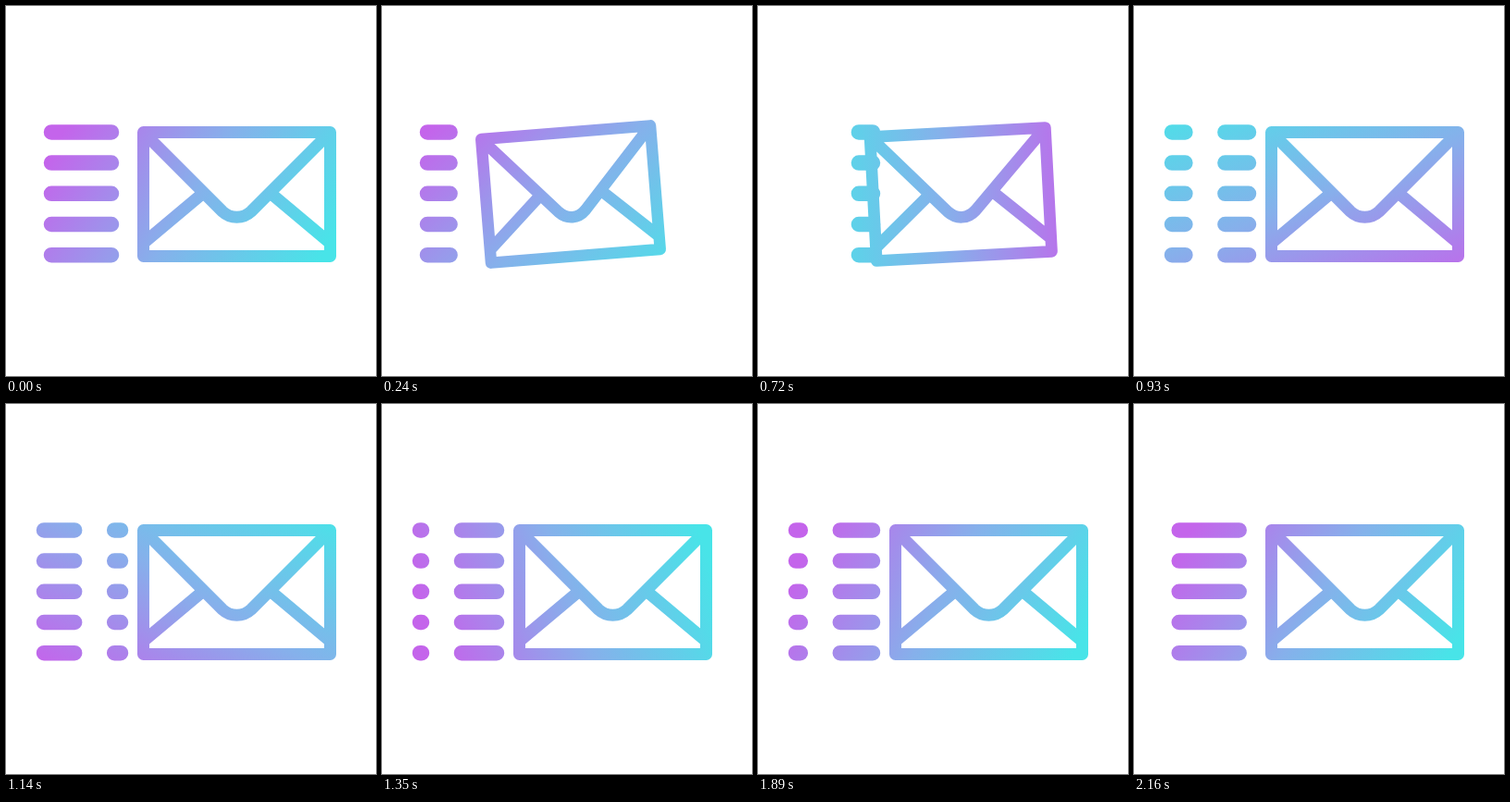
Animation, 400 px wide and 400 px high, one loop 2.22 s. Source, as an HTML page with a canvas:

```html
<!DOCTYPE html>
<html lang="en">
<head>
<meta charset="utf-8">
<title>Sending mail</title>
<style>
  html, body { margin: 0; width: 100%; height: 100%; overflow: hidden; background: #fff; }
  canvas { display: block; width: 400px; height: 400px; }
</style>
</head>
<body>
<canvas id="stage" width="400" height="400"></canvas>
<script>
const ctx = document.getElementById('stage').getContext('2d');
const LOOP = 2220, STEP = 30, LAST = 2160;
const CENTER = { x: 249.5, y: 203.5 };
const TRACK = { x: 41, length: 83, top: 136.4, gap: 33.2, rows: 5 };

const clamp = v => Math.min(1, Math.max(0, v));
const progress = (t, from, to) => clamp((t - from) / (to - from));

// Cubic Bezier easing with flat ends: control points (a, 0) and (b, 1).
function ease(a, b) {
  return p => {
    let lo = 0, hi = 1;
    for (let i = 0; i < 24; i++) {
      const s = (lo + hi) / 2, r = 1 - s;
      const x = 3 * r * r * s * a + 3 * r * s * s * b + s * s * s;
      if (x < p) lo = s; else hi = s;
    }
    return lo * lo * (3 - 2 * lo);
  };
}
const spin = ease(0.34, 0.33);
const inOut = ease(0.42, 0.58);

const envelope = new Path2D(
  'M148.5 136.5H350.5V270.5H148.5Z' +
  'M150 138L233.5 221.7C243 230.5 256 230.5 265.5 221.7L349 138' +
  'M149 256L211 204M350 256L288 204'
);

function paint(t) {
  const angle = (31 + 360 * spin(t / LAST)) * Math.PI / 180;
  const dx = 155 * Math.cos(angle), dy = 155 * Math.sin(angle);
  const g = ctx.createLinearGradient(202 - dx, 203 - dy, 202 + dx, 203 + dy);
  g.addColorStop(0, 'rgb(196,100,235)');
  g.addColorStop(0.5, 'rgb(134,176,235)');
  g.addColorStop(1, 'rgb(72,228,232)');
  return g;
}

function drawLines(from, to) {
  const a = Math.max(0, from), b = Math.min(TRACK.length, to);
  if (b <= a) return;
  ctx.lineWidth = 16.5;
  ctx.beginPath();
  for (let i = 0; i < TRACK.rows; i++) {
    const y = TRACK.top + i * TRACK.gap;
    ctx.moveTo(TRACK.x + a, y);
    ctx.lineTo(TRACK.x + b, y);
  }
  ctx.stroke();
}

function drawWind(t) {
  if (t < 420) {
    drawLines(8, 8 + 65 * (1 - inOut(t / 420)));
    return;
  }
  const since = t - 690;
  if (since <= 0) return;
  // A fast burst that settles into a steady drift to the left.
  const burst = 106 * (1 - Math.pow(1 - clamp(since / 450), 1.53));
  const head = TRACK.length - 0.1485 * since - burst;
  const size = 40 + 25 * inOut(progress(t, 1890, LAST));
  for (let n = 0; n < 5; n++) {
    const start = head + n * TRACK.length;
    drawLines(start, start + size);
  }
}

function drawEnvelope(t) {
  const k = t < 480 ? inOut(t / 480) : 1 - inOut(progress(t, 480, 880));
  const pose = new DOMMatrix()
    .translate(CENTER.x - 91 * k, CENTER.y)
    .rotate(-9.2 * k)
    .scale(1 - 0.185 * k, 1)
    .translate(-CENTER.x, -CENTER.y);
  const shape = new Path2D();
  shape.addPath(envelope, pose);
  ctx.lineWidth = 13 - k;
  ctx.stroke(shape);
}

function draw(t) {
  ctx.fillStyle = '#fff';
  ctx.fillRect(0, 0, 400, 400);
  ctx.lineCap = ctx.lineJoin = 'round';
  ctx.strokeStyle = paint(t);
  drawWind(t);
  drawEnvelope(t);
}

const begin = performance.now();
function tick() {
  const t = (performance.now() - begin) % LOOP;
  draw(Math.min(LAST, Math.floor(t / STEP) * STEP));
  requestAnimationFrame(tick);
}
tick();
</script>
</body>
</html>
```
